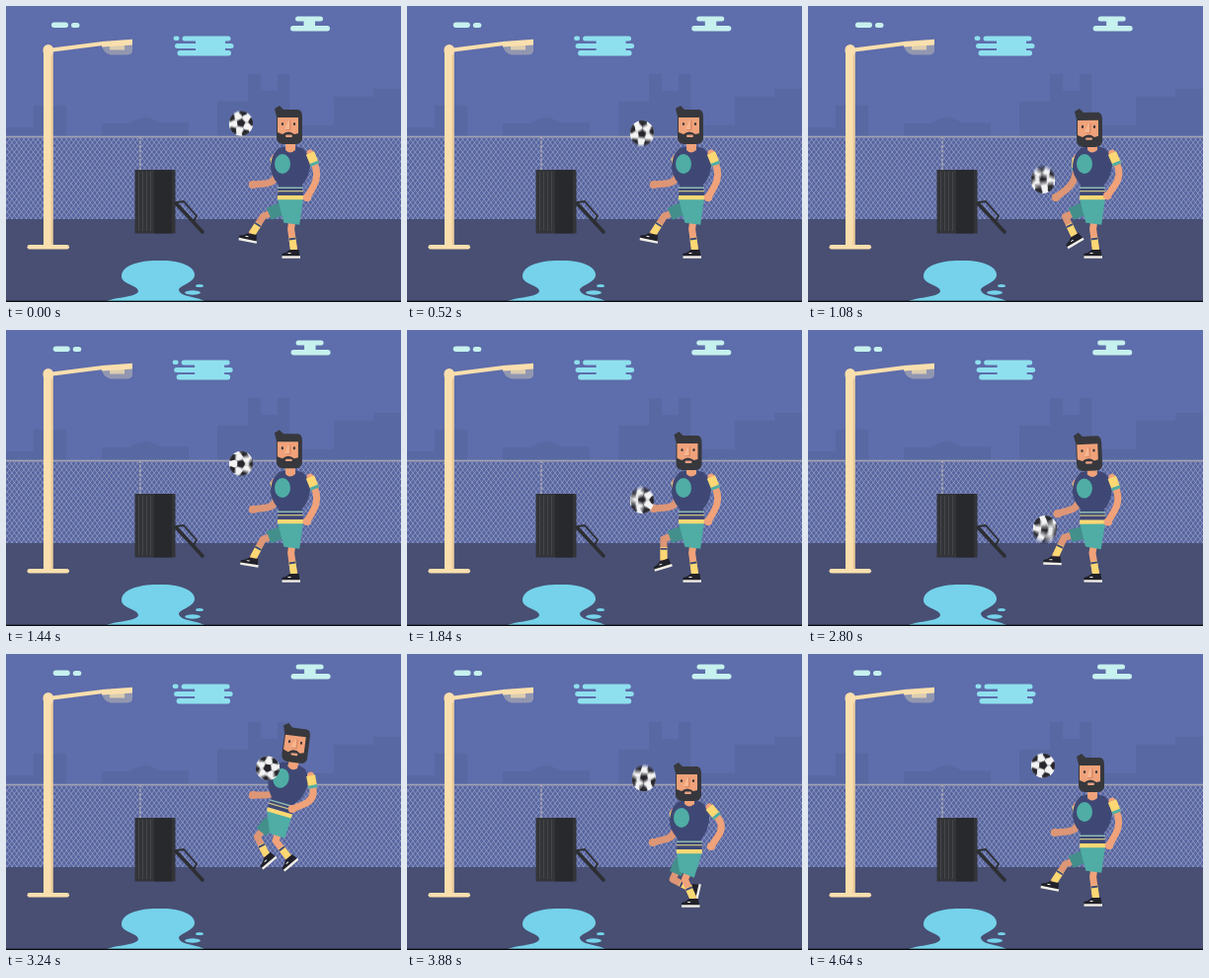
These frames come from a looping animation (400x300 px, 4680 ms). An HTML page with a canvas:

```html
<!DOCTYPE html>
<html lang="en">
<head>
<meta charset="utf-8">
<title>Juggling</title>
<style>
  html, body { margin: 0; width: 100%; height: 100%; overflow: hidden; background: #5e6dab; }
  canvas { display: block; width: 400px; height: 300px; }
</style>
</head>
<body>
<canvas id="stage" width="400" height="300"></canvas>
<script>
const LOOP = 4680;
const C = {
  sky: '#5e6dab', city: '#5868a3', ground: '#484f73', cream: '#fadfae', dark: '#37383d',
  navy: '#3f4875', teal: '#4fada5', yellow: '#fbd873', skin: '#f0a27a', cloud: '#c6f1ee', water: '#75d2ea',
  farTeal: '#438f8b', farSkin: '#dd9676'
};
const stage = document.getElementById('stage').getContext('2d');
let g;

function fill(color, path) { g.fillStyle = color; g.fill(new Path2D(path)); }
function rect(color, x, y, w, h) { g.fillStyle = color; g.fillRect(x, y, w, h); }
function pill(color, x, y, w, h) {
  g.fillStyle = color;
  g.beginPath();
  g.roundRect(x, y, w, h, Math.min(w, h) / 2);
  g.fill();
}
function oval(color, x, y, rx, ry) {
  g.fillStyle = color;
  g.beginPath();
  g.ellipse(x, y, rx, ry, 0, 0, 7);
  g.fill();
}
function line(color, width, cap, ...pts) {
  g.strokeStyle = color;
  g.lineWidth = width;
  g.lineCap = cap;
  g.lineJoin = 'round';
  g.beginPath();
  pts.forEach(p => g.lineTo(p[0], p[1]));
  g.stroke();
}
function at(x, y, angle, draw) {
  g.save();
  g.translate(x, y);
  g.rotate(angle);
  draw();
  g.restore();
}
function sprite(w, h, draw) {
  const canvas = document.createElement('canvas');
  canvas.width = w;
  canvas.height = h;
  g = canvas.getContext('2d');
  draw();
  return canvas;
}

function drawFence() {
  g.save();
  g.beginPath();
  g.rect(0, 132, 400, 84);
  g.clip();
  rect('#5765a0', 0, 132, 400, 84);
  for (let x = -66; x < 466; x += 4.8) {
    line('rgba(190,194,218,.6)', .75, 'butt', [x, 132], [x + 63, 216]);
    line('rgba(190,194,218,.6)', .75, 'butt', [x, 132], [x - 63, 216]);
  }
  g.restore();
  rect('#a3a2b2', 0, 131.7, 400, 1.6);
  g.setLineDash([3, 1.5]);
  line('#a3a2b2', 1.8, 'butt', [136, 132], [136, 168]);
  g.setLineDash([]);
}

function drawLamp() {
  fill('#9297b1', 'M97 39H128V46Q127 49.5 122 49.5H106Q98 48 97 39Z');
  rect('#dccdb0', 105, 40, 15, 4.5);
  rect(C.cream, 38, 44, 9.5, 200);
  rect('#eccb98', 45.5, 48, 2, 195);
  pill(C.cream, 37.5, 39, 10.5, 12);
  line(C.cream, 4, 'round', [43, 45], [98, 38]);
  fill(C.cream, 'M97 36L128 33.8V39.5L97 41.5Z');
  pill(C.cream, 21.5, 242, 42.5, 4.6);
}

function drawBin() {
  rect('#333438', 130.5, 166, 41, 64.5);
  for (let x = 134; x < 149; x += 4) rect('#45464a', x, 168, 1, 60);
  rect('#28292c', 150, 166, 18, 64.5);
  line('#2d2e32', 3.6, 'round', [172, 200], [199, 229]);
  line('#2d2e32', 1.8, 'round', [173, 199], [180, 198], [193, 213], [190, 218]);
}

function drawScene() {
  rect(C.sky, 0, 0, 400, 300);
  fill(C.city, 'M0 123H28V101H61V132H97V119H125Q140 108 155 118H185V132H214V97H245V69H258V86H275V69H287V121H332V92H372V84H400V140H0Z');
  drawFence();
  rect(C.ground, 0, 216, 400, 84);
  drawLamp();
  drawBin();
  fill(C.water, 'M154 258C178 257 192 265 191 273C190 281 175 283 175 288C177 295 192 294 201 299H102C112 295 133 295 134 289C134 283 117 282 117 274C117 264 132 258 154 258Z');
  oval(C.water, 189, 290.5, 8, 2.2);
  oval(C.water, 196, 283.5, 4, 1.6);
  rect('#090a10', 0, 298.7, 400, 1.3);
}

function drawClouds(t) {
  const d = 1 - Math.cos(t / LOOP * 4 * Math.PI);
  pill(C.cloud, 46 + d, 16.5, 17, 5.5);
  pill(C.cloud, 66 + d, 17, 8.5, 5);
  at(-d / 2, 0, 0, () => {
    const c = '#8fe0ee';
    pill(c, 169.5, 30.5, 6, 4.5);
    pill(c, 178.5, 30.5, 49, 5);
    rect(c, 192, 35, 30, 11);
    pill(c, 171, 38, 59.5, 5);
    pill(c, 173.5, 45, 54.5, 5.5);
  });
  at(d / 3, 0, 0, () => {
    pill(C.cloud, 293, 10.5, 28, 5);
    rect(C.cloud, 301.5, 14, 11.5, 7);
    pill(C.cloud, 288, 20, 40, 5.5);
  });
}

// Each pose: hip, chest, head (+tilt), front foot, standing foot (+angle), front hand, back hand
const follow = {
  hip: [286, 200], chest: [288, 161], head: [287, 120, 0],
  front: [249, 231, .2], stand: [291.5, 247, 0], fist: [250, 181], palm: [305, 194]
};
const windUp = { ...follow, head: [285, 123, 0], front: [272, 233, -.6], fist: [251, 195], palm: [303, 192] };
const swing = { ...follow, head: [285.5, 122, 0], front: [260, 233, -.3] };
const kick = { ...follow, head: [285, 122, -.03], front: [249, 229, .08], fist: [251, 186] };
const crouch = {
  hip: [289, 203], chest: [286, 170], head: [276, 135, -.2],
  front: [277, 236, -.8], stand: [291, 246, .1], fist: [281, 190], palm: [283, 201]
};
const jump = {
  hip: [274, 164], chest: [286, 129], head: [294, 90, .13],
  front: [264, 204, -.7], stand: [286, 206, -.7], fist: [250, 143], palm: [290, 157]
};
const back = {
  hip: [284, 204], chest: [286, 167], head: [285, 129, 0],
  front: [288, 238, -1.35], stand: [290, 248, 0], fist: [249, 191], palm: [308, 195]
};
const keys = [
  [0, follow], [60, follow], [185, windUp], [285, kick], [480, follow], [760, follow],
  [1060, windUp], [1165, kick], [1400, follow], [1690, windUp], [1840, swing], [1950, kick],
  [2090, follow], [2320, crouch], [2610, windUp], [2765, kick], [3020, crouch],
  [3235, jump], [3440, crouch], [3640, swing], [3880, back], [4095, kick],
  [4330, follow], [LOOP, follow]
];
const mix = (a, b, u) => a.map((v, i) => v + (b[i] - v) * u);

function poseAt(t) {
  const i = keys.findIndex(k => k[0] > t), [t0, a] = keys[i - 1], [t1, b] = keys[i];
  const u = (t - t0) / (t1 - t0), e = u * u * (3 - 2 * u), pose = {};
  for (const part in a) pose[part] = mix(a[part], b[part], e);
  return pose;
}

function joint(p, q, len, side) {
  const dx = q[0] - p[0], dy = q[1] - p[1], d = Math.hypot(dx, dy) || 1;
  const h = side * Math.sqrt(Math.max(0, len * len - d * d / 4)) / d;
  return [(p[0] + q[0]) / 2 - dy * h, (p[1] + q[1]) / 2 + dx * h];
}

function drawLeg(hip, foot, skin, cloth) {
  const knee = joint(hip, foot, 21.2, 1);
  line(skin, 7, 'round', hip, knee, foot);
  line(C.yellow, 7, 'butt', mix(knee, foot, .4), foot);
  line(C.navy, 7, 'butt', mix(knee, foot, .43), mix(knee, foot, .52));
  line(cloth, 13, 'butt', hip, mix(hip, knee, .7));
  at(foot[0], foot[1], foot[2], () => {
    fill('#20212a', 'M-4 0H5L6 7H-12V4Q-7 3 -4 0Z');
    rect('#f3f0e8', -12, 6.3, 18.5, 2.4);
    rect('#f3f0e8', -6, 3, 3, 1);
  });
  return knee;
}

function drawShorts(left, right, hip, knee) {
  const end = mix(hip, knee, .75);
  const a = Math.atan2(knee[1] - hip[1], knee[0] - hip[0]);
  const dx = 8 * Math.sin(a), dy = 8 * Math.cos(a);
  g.fillStyle = C.teal;
  g.beginPath();
  [left, right, [end[0] + dx, end[1] - dy], [end[0] - dx, end[1] + dy]].forEach(p => g.lineTo(...p));
  g.fill();
}

function drawArm(shoulder, hand, skin) {
  const elbow = joint(shoulder, hand, 25, -1);
  const bend = (a, b) => mix(a, elbow, b);
  g.strokeStyle = skin;
  g.lineWidth = 7;
  g.lineCap = 'round';
  g.beginPath();
  g.moveTo(...shoulder);
  g.lineTo(...bend(shoulder, .5));
  g.quadraticCurveTo(...elbow, ...bend(hand, .5));
  g.lineTo(...hand);
  g.stroke();
  oval(skin, hand[0], hand[1], 4.2, 4);
  line(C.yellow, 9, 'butt', shoulder, bend(shoulder, .5));
  line(C.teal, 9, 'butt', bend(shoulder, .4), bend(shoulder, .52));
}

function drawTorso() {
  fill(C.navy, 'M-12 -17Q0 -21 12 -17Q23 -8 19 6Q17 16 12 20L13 31H-13L-12 20Q-21 10 -20 0Q-19 -10 -12 -17Z');
  oval(C.teal, -8, -1, 8, 10);
  rect('#8fb9b2', -13, 22.5, 26, 1.5);
  rect('#c9c184', -13, 26, 26, 1.3);
  rect(C.yellow, -13, 31, 26, 4.2);
  fill(C.skin, 'M-5 -24H5V-15Q0 -10 -5 -15Z');
}

function drawHead() {
  fill(C.dark, 'M-13 -8L-15 -16L-10 -19L-6 -15L9 -15Q13 -14 13 -8V15Q12 20 6 20H-7Q-13 19 -13 13Z');
  fill(C.skin, 'M-12 -7H9V9L5 10Q-1 5 -7 10L-12 8Z');
  fill('#d98a66', 'M-1 -4H1.5V6H-4V4.5H0Z');
  fill('#f6b690', 'M-1 -4L-5 5H0V-4Z');
  oval(C.dark, -7, -.5, 1.1, 1.6);
  oval(C.dark, 5, -.5, 1.1, 1.6);
  pill('#e7a183', -4, 10.5, 7, 2.4);
}

function drawPlayer(t) {
  const { hip, chest, head, front, stand, fist, palm } = poseAt(t);
  const lean = Math.atan2(chest[0] - hip[0], hip[1] - chest[1]) - .05;
  const cos = Math.cos(lean), sin = Math.sin(lean);
  const onBody = (x, y) => [chest[0] + x * cos - y * sin, chest[1] + x * sin + y * cos];
  const thigh = [hip[0] + 5.5, hip[1] + 5];
  drawArm(onBody(-16, -7), fist, C.farSkin);
  drawLeg([hip[0] - 6, hip[1] + 5], front, C.farSkin, C.farTeal);
  const knee = drawLeg(thigh, stand, C.skin, C.teal);
  drawShorts(onBody(-13, 34), onBody(13, 34), thigh, knee);
  at(chest[0], chest[1], lean, drawTorso);
  drawArm(onBody(20, -12), palm, C.skin);
  at(head[0], head[1], head[2], drawHead);
}

// Ball contacts: time, x, y, spin of the next flight, gravity
const hits = [
  [4095 - LOOP, 238, 217, .004, 1], [285, 238, 217, .005, 1], [1165, 238, 217, .022, 1],
  [1950, 238, 217, .003, 1], [2765, 238, 217, .025, 1], [3255, 266, 117, .009, .82],
  [4095, 238, 217, .004, 1], [285 + LOOP, 238, 217, 0, 1]
];

function ballAt(t) {
  const i = hits.findIndex(h => h[0] > t), a = hits[i - 1], b = hits[i];
  const dt = t - a[0], u = dt / (b[0] - a[0]);
  const e = a[1] > b[1] ? 1 - (1 - u) ** 2 : u;
  return {
    x: a[1] + (b[1] - a[1]) * e,
    y: a[2] + (b[2] - a[2]) * u - .000585 * a[4] * dt * (b[0] - t),
    spin: -a[3] * dt
  };
}

function patch(x, y, r, turn) {
  g.beginPath();
  for (let k = 0; k < 5; k++) {
    const a = turn + k * Math.PI * .4;
    g.lineTo(x + r * Math.cos(a), y + r * Math.sin(a));
  }
  g.fill();
}

function paintBall() {
  g.scale(2, 2);
  g.translate(13, 13);
  oval('#f1f2f3', 0, 0, 12, 12);
  g.clip();
  for (let k = 0; k < 5; k++) {
    const a = -1.57 + k * Math.PI * .4, cx = Math.cos(a), cy = Math.sin(a);
    line('#9a9ca4', .7, 'butt', [cx * 4, cy * 4], [cx * 9, cy * 9]);
    g.fillStyle = '#25262c';
    patch(cx * 11.5, cy * 11.5, 4.4, a + Math.PI);
  }
  patch(0, 0, 4.6, -1.57);
}

// Blends a few instants of the exposure for motion blur
function drawBall(t) {
  for (let n = 0; n < 5; n++) {
    const { x, y, spin } = ballAt(t - n * 3);
    g.globalAlpha = 1 / (n + 1);
    at(x, y, spin, () => g.drawImage(ball, -13, -13, 26, 26));
  }
  g.globalAlpha = 1;
}

const scene = sprite(400, 300, drawScene);
const ball = sprite(52, 52, paintBall);
g = stage;

function frame() {
  const t = performance.now() % LOOP;
  g.drawImage(scene, 0, 0);
  drawClouds(t);
  drawPlayer(t);
  drawBall(t);
  requestAnimationFrame(frame);
}
frame();
</script>
</body>
</html>
```
